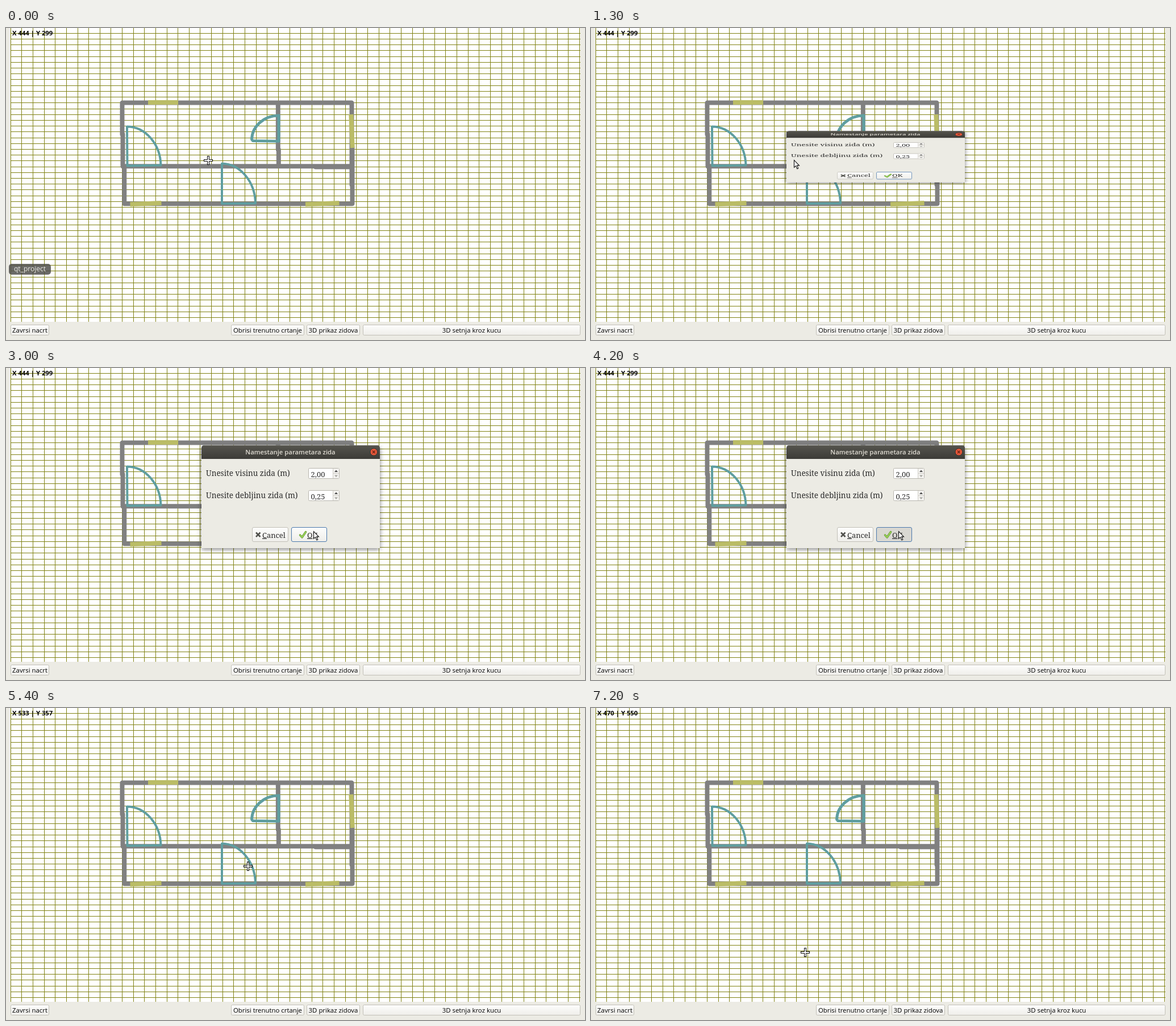
Animation, 1019 px wide and 549 px high, one loop 8000 ms. Source, as an HTML page:

```html
<!DOCTYPE html>
<html lang="sr">
<head>
<meta charset="utf-8">
<title>Nacrt</title>
<style>
  html, body { margin: 0; width: 100%; height: 100%; overflow: hidden; background: #ecebe4; }
  svg { display: block; }
  text { font: 11.4px "Open Sans", "Noto Sans", sans-serif; fill: #000; }
  .mid { text-anchor: middle; }
  #pos { font-weight: 700; font-size: 11.3px; }
  #tip text { font-size: 12px; fill: #e9e9e2; }
  #dialog .title { font-weight: 600; font-size: 11.3px; fill: #dfdbd2; }
  #dialog .serif { font: 13.5px "Noto Serif", serif; fill: #2b2b2b; }
  #dialog .small { font-size: 12.9px; }
  .key { text-decoration: underline; }
  .btn { fill: url(#face); stroke: #c2c0b8; }
  #wall { fill: none; stroke: #808080; stroke-width: 8; stroke-linecap: round; }
  #window { fill: none; stroke: #babc66; stroke-width: 8; }
  #door { fill: none; stroke: #5f9ea0; stroke-width: 4; stroke-linejoin: round; }
  #check { fill: none; stroke-linejoin: round; stroke-linecap: round; }
  #arrow, #cross { fill: #fff; stroke: #111; stroke-width: 1.1; }
</style>
</head>
<body>
<svg width="1019" height="549" viewBox="0 0 1019 549">
  <defs>
    <linearGradient id="face" x2="0" y2="1">
      <stop offset="0" stop-color="#fdfdfc"/><stop offset="1" stop-color="#efeeea"/>
    </linearGradient>
    <linearGradient id="bar" x2="0" y2="1">
      <stop offset="0" stop-color="#56554e"/><stop offset="1" stop-color="#3c3b37"/>
    </linearGradient>
    <filter id="soft" x="-10%" y="-15%" width="120%" height="130%">
      <feGaussianBlur stdDeviation="4.5"/>
    </filter>
    <g id="spin">
      <rect x=".5" y=".5" width="54" height="18" rx="2" fill="#fff" stroke="#b8b6ae"/>
      <path d="M43.5 1h10.5v17h-10.5z" fill="#f3f2ef"/>
      <path d="M43.5 1v17M44 9.5h10" stroke="#cfcdc6" fill="none"/>
      <path d="M46 7h6l-3-3.6z" fill="#4b4b4b"/>
      <path d="M46 12.4h6l-3 3.6z" fill="#a5a5a0"/>
    </g>
    <path id="check" d="M517.5 294l3.5 4l6.5-9.5"/>
  </defs>

  <rect width="1019" height="549" fill="#ecebe4"/>
  <rect x="8" width="1003" height="517" fill="#fff"/>
  <path id="grid" fill="none" stroke="#808214"/>

  <path id="wall" d="M205 131.5H608M204.5 132V187M205.5 187V243M205.5 243.3H609M545 244.5H609
    M208.3 243V309M208.5 309.3H609M608.5 132V276M609.5 211V309M478.8 132V214M479.8 214V239"/>
  <path id="window" d="M250 131H303M607.3 152L609.8 211M218.5 310.2L273.5 308M527 310.2L586.5 308"/>
  <g id="door">
    <path d="M213 173.5A60 70 0 0 1 272.5 241.5L213.5 242.5Z"/>
    <path d="M380 238.5A60 72 0 0 1 439 308.5L380 309Z"/>
    <path d="M480 154A48 43 0 0 0 432.5 196L434.5 198.5L480 199.3Z" stroke-width="5"/>
  </g>

  <text id="pos" x="11" y="13"></text>
  <g id="buttons"></g>

  <g id="tip">
    <rect x="5" y="415" width="74" height="19" rx="5" fill="#4e4e4a" fill-opacity=".84"/>
    <text class="mid" x="42" y="428">qt_project</text>
  </g>

  <g id="dialog">
    <rect x="344" y="140" width="314" height="179" fill="#000" opacity=".5" filter="url(#soft)"/>
    <rect x="344" y="150" width="314" height="167" fill="#ecebe4"/>
    <path d="M344 160V141q0-5 5-5H653q5 0 5 5V160z" fill="url(#bar)"/>
    <path d="M349 136.5H653" stroke="#6d6c64"/>
    <text class="mid title" x="500.5" y="151.5">Namestanje parametara zida</text>
    <circle cx="647.3" cy="147.8" r="6.3" fill="#e6573a" stroke="#33322e"/>
    <path d="M645 145.5l4.6 4.6m0-4.6l-4.6 4.6" stroke="#5b2013" stroke-width="1.2"/>

    <text class="serif" x="352" y="189.5">Unesite visinu zida (m)</text>
    <text class="serif" x="352" y="228.5">Unesite debljinu zida (m)</text>
    <use href="#spin" x="532" y="176"/>
    <use href="#spin" x="532" y="215"/>
    <text class="serif small" x="536.5" y="191.5">2,00</text>
    <text class="serif small" x="536.5" y="231">0,25</text>

    <rect class="btn" x="433.5" y="280.5" width="63" height="25" rx="2.5"/>
    <path d="M440 289.5l7.5 7.5m0-7.5l-7.5 7.5" stroke="#50504c" stroke-width="2.6"/>
    <text class="serif small" x="451" y="298.5"><tspan class="key">C</tspan>ancel</text>
    <rect id="ok" class="btn" x="502.5" y="280.5" width="62" height="25" rx="2.5" style="stroke:#4b79ad"/>
    <use href="#check" stroke="#558f22" stroke-width="3.4"/>
    <use href="#check" stroke="#a5dc62" stroke-width="1.8"/>
    <text class="serif small" x="530" y="298.5"><tspan class="key">O</tspan>K</text>
  </g>
  <path id="fold" d="M344 226.5H658" stroke="#aeaeaa" stroke-width="1.4"/>

  <path id="arrow" d="M1.5-.5V12.3l3-2.7l2.3 5.2l2-.9l-2.200-5h3.900z"/>
  <path id="cross" d="M-1.5-7.5h3v6h6v3h-6v6h-3v-6h-6v-3h6z"/>
</svg>

<script>
const LOOP = 8000, STEP = 100;
const SCALE = 0.7854;  // screen pixels per drawing unit
const START = [356, 233];

// Pointer moves: start and end time, then the points of a line or Bezier curve
const moves = [
  [1800, 2700, [430, 130], [615, 130], [556, 279]],
  [2700, 3000, [540, 288]],
  [4700, 5100, [454, 268]],
  [5300, 5400, [426, 278.4]],
  [5400, 5800, [408, 312]],
  [6100, 6900, [377, 405]],
  [7100, 7200, [377, 430]]
];

const $ = id => document.getElementById(id);
const show = (id, on) => $(id).setAttribute("visibility", on ? "visible" : "hidden");
const ramp = (t, a, b) => Math.min(1, Math.max(0, (t - a) / (b - a)));
const mix = (p, q, k) => p.map((v, i) => v + (q[i] - v) * k);

function bezier(points, k) {
  while (points.length > 1)
    points = points.slice(1).map((q, i) => mix(points[i], q, k));
  return points[0];
}

const pointerAt = t => moves.reduce(
  (from, [a, b, ...points]) => bezier([from, ...points], ramp(t, a, b)), START);

function label([x, y]) {
  const unit = v => Math.round(v / SCALE);
  return `X ${unit(x - 7.5)} | Y ${unit(y + 2)}`;
}

function build() {
  const line = (first, gap, i) => Math.floor(first + gap * SCALE * i) + 0.5;
  let d = "";
  for (let i = 0; i < 52; i++) d += `M${line(8.2, 25, i)} 0V517`;
  for (let i = 0; i < 50; i++) d += `M8 ${line(9.3, 13, i)}H1011`;
  $("grid").setAttribute("d", d);

  $("buttons").innerHTML = [
    [8, 76, "Zavrsi nacrt"],
    [396, 525, "Obrisi trenutno crtanje"],
    [529, 623, "3D prikaz zidova"],
    [628, 1011, "3D setnja kroz kucu"]
  ].map(([l, r, s]) =>
    `<rect class="btn" x="${l + 0.5}" y="522.5" width="${r - l - 1}" height="18" rx="2"/>
     <text class="mid" x="${(l + r) / 2}" y="535.5">${s}</text>`).join("");
}

function draw(time) {
  const t = Math.floor(time / STEP) * STEP;
  const point = pointerAt(t);
  const open = ramp(t, 1200, 1400) - ramp(t, 4300, 4500);
  const arrow = t >= 200 && t < 4500;

  show("tip", t < 200);
  show("arrow", arrow);
  show("cross", !arrow);
  $(arrow ? "arrow" : "cross").setAttribute("transform", `translate(${point})`);

  // The dialog unfolds from its middle line and folds back to it
  show("dialog", open > 0);
  show("fold", t >= 4500 && t < 4800);
  $("dialog").setAttribute("transform", `translate(0 ${226.5 * (1 - open)}) scale(1 ${open})`);
  $("ok").style.fill = t >= 4200 ? "#d9d8d2" : "";

  $("pos").textContent = label(t < 4800 ? START : point);
}

build();
const start = performance.now();
function tick() {
  draw((performance.now() - start) % LOOP);
  requestAnimationFrame(tick);
}
tick();
</script>
</body>
</html>
```
